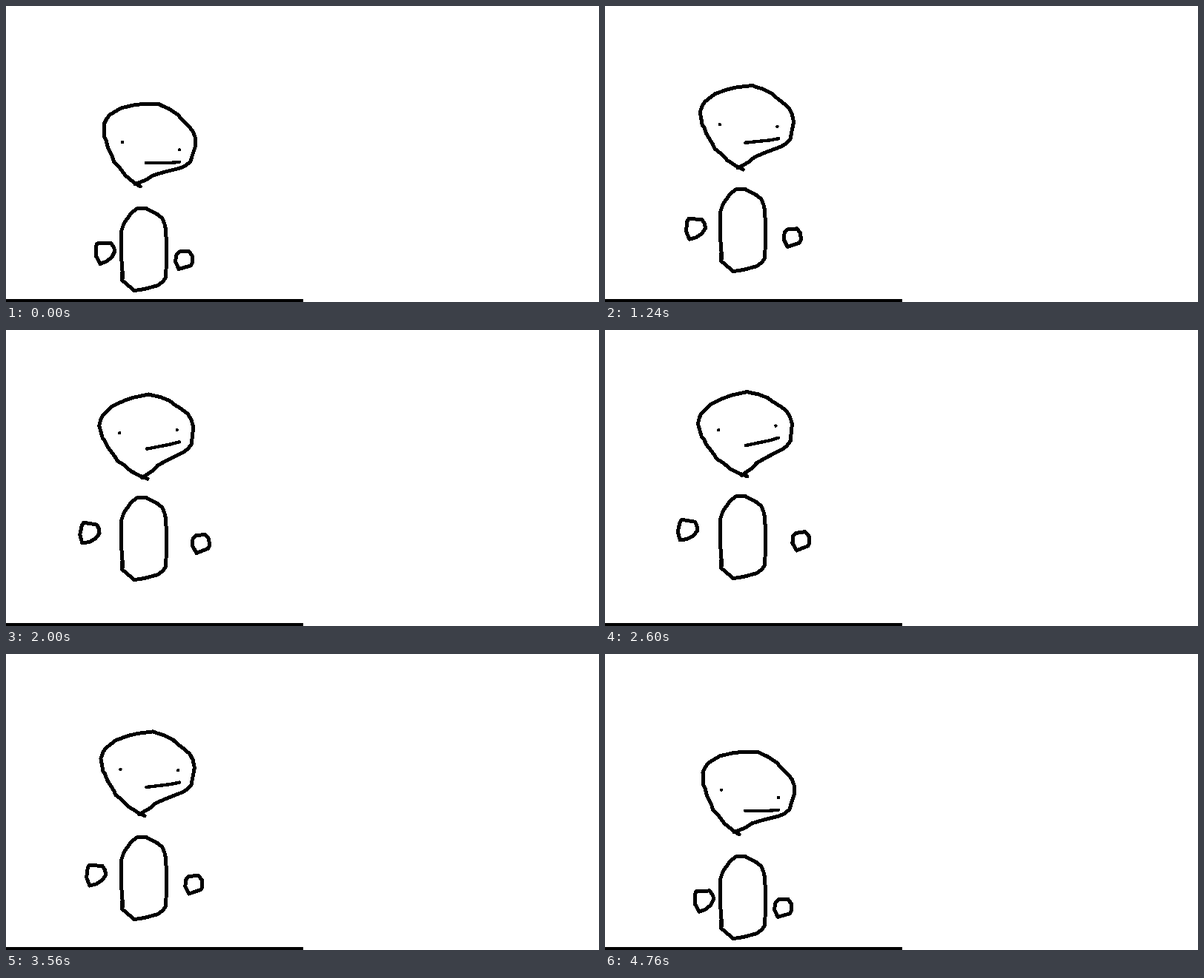
An HTML page for the animation above (4800 ms loop, 800 px wide and 400 px high).

```html
<!DOCTYPE html>
<html lang="en">
<head>
<meta charset="utf-8">
<title>Breathing figure</title>
<style>
  html, body { margin: 0; width: 100%; height: 100%; overflow: hidden; background: #fff; }
  svg { display: block; }
  path { fill: none; stroke: #000; stroke-width: 5; stroke-linecap: round; stroke-linejoin: round; }
  .face path { stroke-width: 4.4; }
</style>
</head>
<body>
<svg width="800" height="400" viewBox="0 0 800 400" shape-rendering="crispEdges">
  <rect y="396" width="401" height="4"/>
  <path id="head" d="M181 244L172 238 161 229 154 219.500 146 211.500 144 205 137 190 135 181 133 178 132 160 136 152 140 147 155 138 172 134 185 132.500 206 132.500 212 135.500 220 139 232 147 236 152 246 162 252 169 255 177 256 188 251 203 249 210 242 216 235 219 215 224 198 229 189 235 174 241"/>
  <g id="face" class="face">
    <path d="M157 184h.01M234 194.500h.01M189 212H222L234 211"/>
  </g>
  <path id="body" d="M156 361V370L173 384.600 187 382.500 205 377.500 212 372 215.500 367 216.500 345 216.700 330 215.700 303 214 295 211 287 205 282 188 273 176 274 168 281 159 294 156 303 155.300 335 157 358 158 367"/>
  <path id="leftHand" d="M123 321L141 320 145 325 147 331 143 339 136 345 127 348.500 121.500 338 121.500 325Z"/>
  <path id="rightHand" d="M234 332L247 331.500 251.500 338 251.500 347 249 351 233 355.500 228.500 345 230 336Z"/>
</svg>
<script>
const LOOP = 4800, STEP = 40;

// Travel and turn at the top of the breath; the pivot is in rest coordinates.
const parts = [
  { id: 'body', dx: 0, dy: -50, turn: 0, pivot: [186, 328], lag: 0 },
  { id: 'head', dx: -3.8, dy: -48, turn: -13, pivot: [194, 180], lag: 40 },
  { id: 'face', dx: 0.5, dy: -61, turn: -12, pivot: [211, 211.5], lag: 65 },
  { id: 'leftHand', dx: -23, dy: -63.5, turn: 13, pivot: [134, 334], lag: 25 },
  { id: 'rightHand', dx: 24.5, dy: -59, turn: -6, pivot: [240, 343], lag: 20 },
];
for (const part of parts) part.node = document.getElementById(part.id);

const breath = t => (1 - Math.cos(2 * Math.PI * t / LOOP)) / 2;

function draw(time) {
  const t = Math.floor(time % LOOP / STEP) * STEP;
  for (const { node, dx, dy, turn, pivot, lag } of parts) {
    const e = breath(t - lag);
    const y = turn ? dy * e : Math.round(dy * e);
    node.setAttribute('transform', `translate(${dx * e} ${y}) rotate(${turn * e} ${pivot})`);
  }
}

const start = performance.now();
function tick() {
  draw(performance.now() - start);
  requestAnimationFrame(tick);
}
tick();
</script>
</body>
</html>
```
